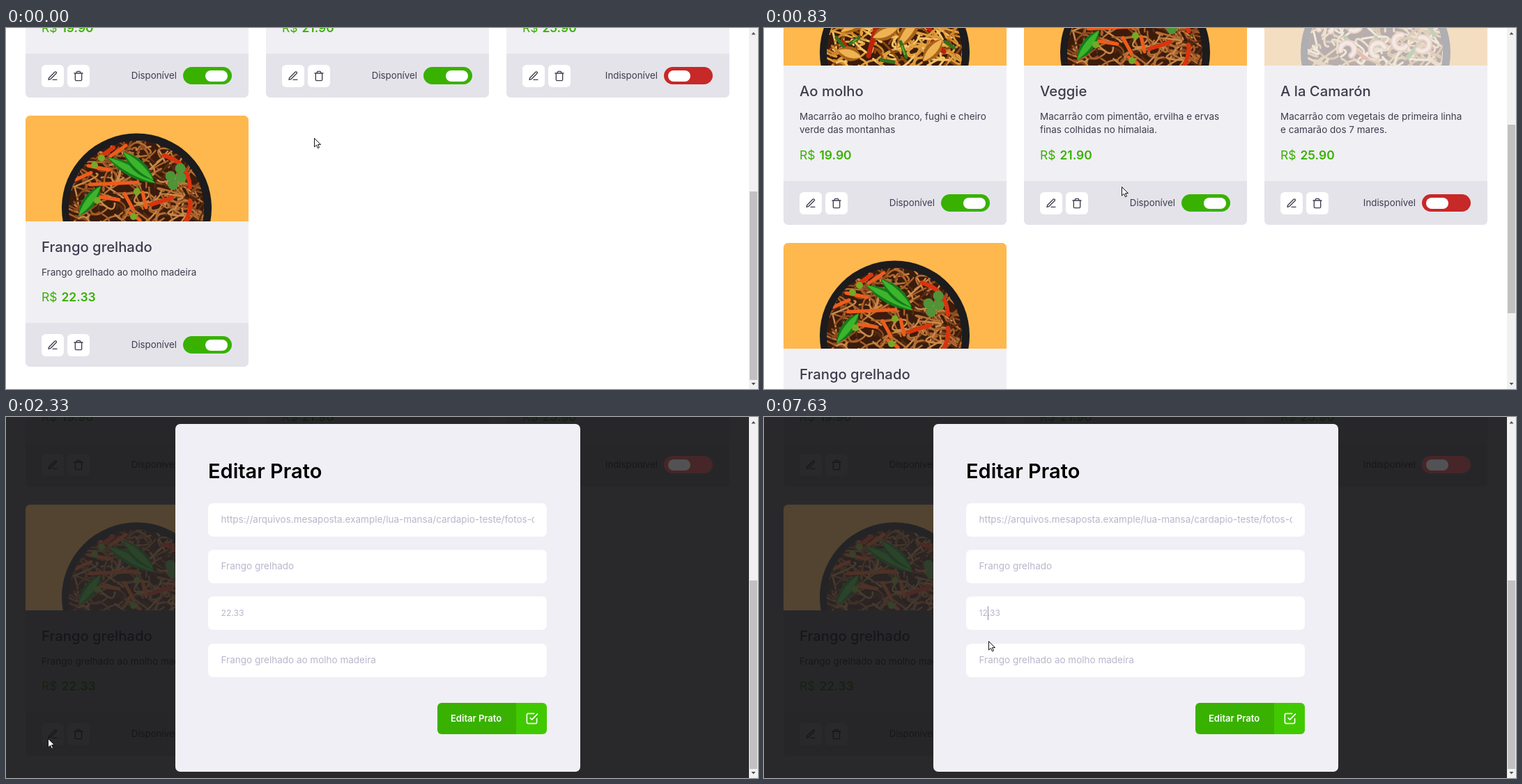
An HTML page for the animation above (8 s loop, 1079x519 px).

```html
<!DOCTYPE html>
<html lang="pt-BR">
<head>
<meta charset="utf-8">
<title>Cardápio</title>
<style>
* { box-sizing: border-box; margin: 0; }
html, body { width: 100%; height: 100%; overflow: hidden; background: #fff; }
body { position: relative; font: 13.5px/19.8px Inter, "Open Sans", sans-serif; color: #3d3d4d; }
svg { display: block; }
#page, #page > *, #shade, #modal, #modal > *, #bar, #bar > *, #cursor { position: absolute; }
#page { left: 0; width: 1066px; height: 944px; }
#top { width: 1066px; height: 223px; background: #c72828; }
#logo { left: 27px; top: 22px; width: 51px; height: 51px; border-radius: 50%; background: #ffb84d; }
#tag { left: 97px; top: 54px; font-size: 11.8px; color: #f4cfcf; }
.btn { width: 157px; height: 45px; border-radius: 6px; background: linear-gradient(90deg, #39b100 113px, #41c900 113px); }
#add { left: 885px; top: 26px; width: 154px; background: linear-gradient(90deg, #39b100 109px, #41c900 109px); }

.card { width: 320px; border-radius: 6.5px; overflow: hidden; background: #f0eff4; }
.photo { position: relative; height: 152px; }
.off .photo { opacity: .3; }
.info { padding: 22px 23px 24.1px; white-space: nowrap; }
h2 { font-weight: 500; font-size: 20.3px; line-height: 30px; margin-bottom: 11.6px; }
.price { margin-top: 12px; font-size: 17.5px; line-height: 27px; color: #39b100; }
.price b { font-weight: 600; margin-left: 1px; }
.foot { display: flex; align-items: center; height: 63px; padding: 0 24px 0 23px; background: #e4e3ea; }
.icon { width: 32px; height: 32px; margin-right: 4.5px; padding: 8px; border-radius: 6px; background: #fff; }
.foot span { margin-left: auto; font-size: 13.3px; }
.switch { position: relative; width: 70px; height: 25px; margin-left: 9px; border-radius: 13px; background: #39b100; }
.switch::after { content: ""; position: absolute; left: 32px; top: 4.5px; width: 32px; height: 16px; border-radius: 8px; background: #fff; }
.off .switch { background: #c72828; }
.off .switch::after { left: 6px; }
.open .photo, .open .switch { z-index: 2; opacity: .2; }

#shade { z-index: 1; width: 1066px; height: 519px; background: rgba(18, 18, 20, .9); }
#modal { z-index: 3; left: 243px; top: 10px; width: 581px; height: 500px; border-radius: 7px; background: #f0eff5; }
#modal h1 { left: 47px; top: 48px; font-size: 29px; line-height: 40px; font-weight: 600; color: #000; }
.field { left: 47px; width: 486px; height: 48px; padding: 14px 18.5px; border-radius: 7px; background: #fff; color: #b7b7cc; }
.field div { display: flex; overflow: hidden; height: 20px; white-space: nowrap; }
#price { font-size: 12.2px; }
#caret { width: 1px; height: 20px; margin-right: -1px; background: #8f8fa6; }
#save { left: 376px; top: 401px; padding-left: 19px; font-size: 13px; line-height: 45px; font-weight: 600; color: #fff; }
#save svg { position: absolute; left: 126px; top: 13px; }
#bar { z-index: 4; left: 1066px; width: 13px; height: 519px; background: #f1f1f1; }
#thumb { left: 1px; width: 11px; height: 271px; background: #c1c1c1; }
#cursor { z-index: 5; overflow: visible; }
</style>
</head>
<body>
<div id="page">
  <div id="top"></div>
  <div id="logo"></div>
  <div id="tag">Comida Italiana, sim.</div>
  <div id="add" class="btn"></div>
</div>
<div id="shade"></div>
<div id="modal">
  <h1>Editar Prato</h1>
  <div id="save" class="btn">Editar Prato</div>
</div>
<div id="bar">
  <svg width="13" height="519" fill="#505050"><path d="M3.5 9.5l3-3.5 3 3.5zM3.5 510l3 3.5 3-3.5z"/></svg>
  <div id="thumb"></div>
</div>
<svg id="cursor" width="12" height="18" fill="#fff" stroke="#111">
  <path id="arrow" d="M.5.5V13l3-2.700 2 4.500 2-.9-2-4.300h4z"/>
  <path id="beam" fill="none" d="M-3-7.500h2.500l.5.5.5-.5H3M0-7V7M-3 7.500h2.500L0 7l.5.5H3"/>
</svg>

<script>
const $ = id => document.getElementById(id);
const LOOP = 8000, MAX_SCROLL = 425;

// ---- icons
const icon = (d, size, color) => `<svg viewBox="0 0 24 24" width="${size}" height="${size}" fill="none"
  stroke="${color}" stroke-width="2" stroke-linecap="round" stroke-linejoin="round"><path d="${d}"/></svg>`;
const PEN = "M12 20h9M16.5 3.5a2.1 2.1 0 0 1 3 3L7 19l-4 1 1-4z";
const BIN = "M3 6h18M19 6v14a2 2 0 0 1-2 2H7a2 2 0 0 1-2-2V6m3 0V4a2 2 0 0 1 2-2h4a2 2 0 0 1 2 2v2";
const CHECK = "M9 11l3 3L22 4M21 12v7a2 2 0 0 1-2 2H5a2 2 0 0 1-2-2V5a2 2 0 0 1 2-2h11";

// ---- dishes
const line = (d, color, w) =>
  `<path d="${d}" fill="none" stroke="${color}" stroke-width="${w}" stroke-linecap="round"/>`;
const dot = (x, y, r, color) => `<circle cx="${x}" cy="${y}" r="${r}" fill="${color}"/>`;

// Pointed oval from one tip to the other
function leaf(x1, y1, x2, y2, w, color) {
  const len = Math.hypot(x2 - x1, y2 - y1), nx = (y1 - y2) / len * w, ny = (x2 - x1) / len * w;
  const mx = (x1 + x2) / 2, my = (y1 + y2) / 2;
  return `<path fill="${color}" d="M${x1} ${y1}Q${mx + nx} ${my + ny} ${x2} ${y2}Q${mx - nx} ${my - ny} ${x1} ${y1}"/>`;
}
const leaves = (list, w, dark, light) => list.map(p =>
  leaf(...p, w, dark) + leaf(...p, w * .55, light)).join("");

function noodles(colors, count, width) {
  let seed = 7, out = "";
  const rnd = () => (seed = seed * 16807 % 2147483647) / 2147483647;
  const off = n => ((rnd() - .5) * n).toFixed(1);
  for (let i = 0; i < count; i++) {
    const x = (60 + rnd() * 200).toFixed(1), y = (32 + rnd() * 125).toFixed(1);
    out += line(`M${x} ${y}q${off(50)} ${off(50)} ${off(75)} ${off(55)}`, colors[i % colors.length], width);
  }
  return out;
}

const dishes = {
  veggie: () => noodles(["#a8602a", "#552a12", "#c98a4a", "#8c4a1e", "#b56f34"], 260, 2.5)
    + line("M92 99l68-3M122 58l22-15M100 116l34 5M168 110l5 22M150 140l14 10M72 92l22-10M90 72l30 6M142 112l12 22", "#ee5c1c", 5)
    + line("M198 57q36 10 38 46M236 122q2 12-6 30M180 128l30-10M106 60l20-14", "#d9340f", 6)
    + leaves([[118, 60, 186, 97, 19], [140, 52, 184, 93, 16], [76, 144, 108, 101, 19]].map(p => p.slice(0, 4)), 18, "#14791a", "#3cb42c")
    + [[99, 71], [109, 61], [103, 122], [155, 145], [160, 109]].map(([x, y]) => dot(x, y, 5, "#76a827")).join("")
    + [[222, 76], [208, 87], [223, 89], [212, 99]].map(([x, y]) => dot(x, y, 7.5, "#4f9437")).join(""),
  chicken: () => noodles(["#e5a33f", "#8f4a12", "#f3c469", "#cf862a", "#dd9a3c"], 240, 3)
    + line("M122 138l10-38M152 62l8-20M196 84l14 16M98 60l14-10M214 118l16 14M172 110l8-18M84 118l10 14", "#bd240e", 7)
    + leaves([[118, 84, 192, 64], [162, 128, 198, 76], [82, 104, 126, 78], [128, 112, 164, 98],
      [200, 146, 228, 114], [78, 130, 112, 140], [200, 66, 236, 88]], 21, "#a8641a", "#eeb252")
    + line("M122 62q36-16 74 6M124 46l12 14M168 118l8 22M232 118l12 8M96 120l12-8M186 52l16 8M76 112l10 12M140 144l18 3", "#356f1e", 5)
    + line("M126 61q32-12 64 4M100 118l5-4M170 124l4 12", "#73ab35", 2),
  shrimp: () => noodles(["#e9c07a", "#b9803a", "#f3dca8", "#d2a052"], 220, 3)
    + line("M108 66l24-14M190 56l26 14M222 110l18 16M130 130l16 12M178 90l14-14", "#cd4d24", 5)
    + line("M92 76l14 12M168 50l16 6M206 140l12-14M116 112l10 10M236 96l8 12M160 112l6 12", "#5b8a33", 6)
    + [[88, 95], [130, 92], [182, 82], [214, 78], [162, 128], [120, 128], [228, 122], [150, 62], [194, 118]]
      .map(([x, y], i) => {
        const curl = "M-10 5A10 10 0 1 1 7 8";
        return `<g transform="translate(${x} ${y}) rotate(${i * 75})">${line(curl, "#dd9468", 9)}${line(curl, "#f8dcc4", 5)}</g>`;
      }).join("")
};

const photo = kind => `<svg width="320" height="152">
  <clipPath id="${kind}"><circle cx="159" cy="133" r="97"/></clipPath>
  <rect width="320" height="152" fill="#ffb84d"/>${dot(159.5, 133, 107.5, "#1c1b1d")}
  <g clip-path="url(#${kind})">${dot(159, 133, 97, "#3b1c0c")}${dishes[kind]()}</g></svg>`;

// ---- page content
function addCard(x, y, kind, name, text, price, on = true) {
  $("page").insertAdjacentHTML("beforeend", `<div class="card ${on ? "" : "off"}" style="left:${x}px;top:${y}px">
    <div class="photo">${photo(kind)}</div>
    <div class="info"><h2>${name}</h2><p>${text}</p><div class="price">R$ <b>${price}</b></div></div>
    <div class="foot"><div class="icon">${icon(PEN, 16, "#3d3d4d")}</div><div class="icon">${icon(BIN, 16, "#3d3d4d")}</div>
      <span>${on ? "Disponível" : "Indisponível"}</span><div class="switch"></div></div></div>`);
}
addCard(28, 144, "chicken", "Ao molho", "Macarrão ao molho branco, fughi e cheiro<br>verde das montanhas", "19.90");
addCard(373, 144, "veggie", "Veggie", "Macarrão com pimentão, ervilha e ervas<br>finas colhidas no himalaia.", "21.90");
addCard(718, 144, "shrimp", "A la Camarón", "Macarrão com vegetais de primeira linha<br>e camarão dos 7 mares.", "25.90", false);
addCard(28, 551, "veggie", "Frango grelhado", "Frango grelhado ao molho madeira", "22.33");

["https://arquivos.mesaposta.example/lua-mansa/cardapio-teste/fotos-de-pratos",
 "Frango grelhado",
 '<span id="before"></span><i id="caret"></i><span id="after">.33</span>',
 "Frango grelhado ao molho madeira"
].forEach((html, i) => $("modal").insertAdjacentHTML("beforeend",
  `<div class="field" style="top:${114 + i * 67.2}px"><div ${i == 2 ? 'id="price"' : ""}>${html}</div></div>`));
$("save").insertAdjacentHTML("beforeend", icon(CHECK, 19, "#fff"));

// ---- timeline: [time, ...values]
const scrollKeys = [[20, 425], [330, 58], [370, 50], [630, 50], [730, 59.6], [930, 419], [1070, 425]];
const cursorKeys = [[20, 442, 158], [330, 513, 228], [1270, 513, 228], [1350, 519, 222], [1930, 60, 462],
  [2630, 60, 462], [3430, 324, 284], [3480, 324, 284], [3900, 322, 322]];
const typedKeys = [[0, "22"], [4970, "2"], [5100, ""], [6430, "1"], [6570, "12"]];
const caretKeys = [[0, 0], [3670, 1], [4200, 0], [4670, 1], [5230, 0], [5770, 1], [6300, 0], [6430, 1], [7100, 0], [7630, 1]];

const held = (keys, t) => keys.filter(k => k[0] <= t).pop()[1];

function eased(keys, t) {
  const i = keys.findIndex(k => k[0] > t);
  if (i < 1) return (i ? keys[keys.length - 1] : keys[0]).slice(1);
  const a = keys[i - 1], b = keys[i];
  const u = (t - a[0]) / (b[0] - a[0]), s = u * u * (3 - 2 * u);
  return a.slice(1).map((v, j) => v + (b[j + 1] - v) * s);
}

function draw(t) {
  const [scroll] = eased(scrollKeys, t);
  $("page").style.top = -scroll + "px";
  $("thumb").style.top = 13 + scroll / MAX_SCROLL * 222 + "px";

  const fade = Math.max(0, Math.min(1, (t - 2280) / 45));
  $("shade").style.opacity = $("modal").style.opacity = fade;
  document.body.classList.toggle("open", fade > 0);

  $("before").textContent = held(typedKeys, t);
  $("caret").style.opacity = held(caretKeys, t);

  const [x, y] = eased(cursorKeys, t);
  const inField = fade > 0 && x > 290 && y > 124 && y < 373 && (y - 124) % 67.2 < 48;
  $("cursor").style.left = x + "px";
  $("cursor").style.top = y + "px";
  $("arrow").style.display = inField ? "none" : "";
  $("beam").style.display = inField ? "" : "none";
}

const start = performance.now();
function tick() {
  draw((performance.now() - start) % LOOP);
  requestAnimationFrame(tick);
}
tick();
</script>
</body>
</html>
```
